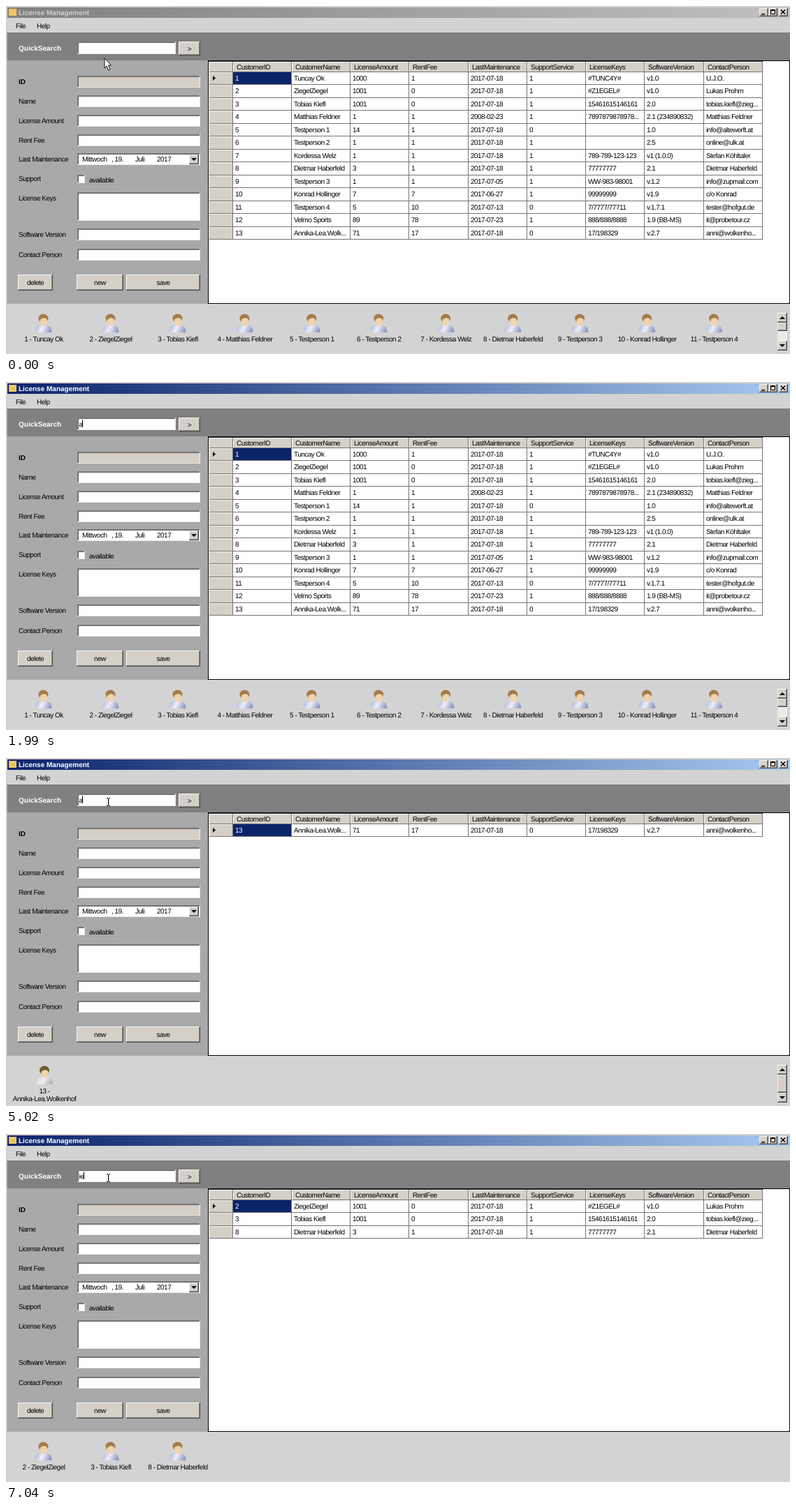
These frames come from a looping animation (1122 by 499 pixels, 8 s). An HTML page with a canvas:

```html
<!DOCTYPE html>
<html lang="en">
<head>
<meta charset="utf-8">
<title>License Management</title>
<style>
html, body { margin: 0; width: 100%; height: 100%; overflow: hidden; background: #d3d3d3; }
canvas { display: block; width: 1122px; height: 499px; }
</style>
</head>
<body>
<canvas id="stage"></canvas>
<script>
const W = 1122, H = 499, LOOP = 8000;
const canvas = document.getElementById('stage');
const dpr = window.devicePixelRatio || 1;
canvas.width = W * dpr;
canvas.height = H * dpr;
const ctx = canvas.getContext('2d');
ctx.scale(dpr, dpr);
ctx.textRendering = 'geometricPrecision';

const FACE = '#d4d0c8', NAVY = '#0a246a', LIGHT = '#d3d3d3', LINE = '#747474';
const FAMILY = '"Liberation Sans", Arial, sans-serif';

const HEADS = ['CustomerID', 'CustomerName', 'LicenseAmount', 'RentFee', 'LastMaintenance',
  'SupportService', 'LicenseKeys', 'SoftwareVersion', 'ContactPerson'];
const ROWS = [
  '1|Tuncay Ok|1000|1|2017-07-18|1|#TUNC4Y#|v1.0|U.J.O.',
  '2|ZiegelZiegel|1001|0|2017-07-18|1|#Z1EGEL#|v1.0|Lukas Prohm',
  '3|Tobias Kiefl|1001|0|2017-07-18|1|15461615146161|2.0|tobias.kiefl@zieg...',
  '4|Matthias Feldner|1|1|2008-02-23|1|7897879878978...|2.1 (234890832)|Matthias Feldner',
  '5|Testperson 1|14|1|2017-07-18|0||1.0|info@altewerft.at',
  '6|Testperson 2|1|1|2017-07-18|1||2.5|online@ulk.at',
  '7|Kordessa Welz|1|1|2017-07-18|1|789-789-123-123|v1 (1.0.0)|Stefan Köhltaler',
  '8|Dietmar Haberfeld|3|1|2017-07-18|1|77777777|2.1|Dietmar Haberfeld',
  '9|Testperson 3|1|1|2017-07-05|1|WW-983-98001|v.1.2|info@zupmail.com',
  '10|Konrad Hollinger|7|7|2017-06-27|1|99999999|v1.9|c/o Konrad',
  '11|Testperson 4|5|10|2017-07-13|0|7/7777/77711|v.1.7.1|tester@hofgut.de',
  '12|Velmo Sports|89|78|2017-07-23|1|888/888/8888|1.9 (BB-MS)|it@probetour.cz',
  '13|Annika-Lea.Wolk...|71|17|2017-07-18|0|17/198329|v.2.7|anni@wolkenho...'
].map(r => r.split('|'));

const ALL = ROWS, ONE = [ROWS[12]], THREE = [ROWS[1], ROWS[2], ROWS[7]];

const STEPS = [
  { at: 0, rows: ALL, text: '', pointer: 'arrow' },
  { at: 1000, rows: ALL, text: '', pointer: 'beam', tint: '#24378c' },
  { at: 1990, rows: ALL, text: 'a', caret: true },
  { at: 3000, rows: ONE, text: 'anni', pointer: 'beam' },
  { at: 4010, rows: ONE, text: 'anni', pointer: 'beam', caret: true },
  { at: 5020, rows: ONE, text: 'a', pointer: 'beam', caret: true },
  { at: 6030, rows: ONE, text: 'ie', caret: true },
  { at: 7040, rows: THREE, text: 'ie', pointer: 'beam', caret: true }
];

function rect(x, y, w, h, color) {
  ctx.fillStyle = color;
  ctx.fillRect(x, y, w, h);
}

function poly(points, color) {
  ctx.beginPath();
  points.forEach(([x, y]) => ctx.lineTo(x, y));
  ctx.closePath();
  ctx.fillStyle = color;
  ctx.fill();
}

function oval(x, y, rx, ry, color) {
  ctx.beginPath();
  ctx.ellipse(x, y, rx, ry, 0, 0, Math.PI * 2);
  ctx.fillStyle = color;
  ctx.fill();
}

// y is the vertical middle of the capitals
function label(str, x, y, { color = '#000', bold = false, align = 'left' } = {}) {
  ctx.font = (bold ? 'bold ' : '') + '10px ' + FAMILY;
  ctx.letterSpacing = bold ? '0px' : '-0.5px';
  ctx.textAlign = align;
  ctx.fillStyle = color;
  ctx.fillText(str, x, y + 3.6);
}

function edges(x, y, w, h, topLeft, bottomRight) {
  rect(x, y, w, 1, topLeft);
  rect(x, y, 1, h, topLeft);
  rect(x, y + h - 1, w, 1, bottomRight);
  rect(x + w - 1, y, 1, h, bottomRight);
}

function sunken(x, y, w, h, fill = '#fff') {
  rect(x, y, w, h, fill);
  edges(x, y, w, h, '#7c7c7c', '#ebe9e4');
  rect(x + 1, y + 1, w - 2, 1, '#6a6a68');
  rect(x + 1, y + 1, 1, h - 2, '#6a6a68');
}

function raised(x, y, w, h) {
  rect(x, y, w, h, FACE);
  edges(x, y, w, h, '#f6f5f2', '#484848');
  rect(x + 1, y + h - 2, w - 2, 1, '#908d88');
  rect(x + w - 2, y + 1, 1, h - 2, '#908d88');
}

function button(str, x, y, w, h) {
  raised(x, y, w, h);
  label(str, x + w / 2, y + h / 2, { align: 'center' });
}

function titleBar(active) {
  const g = ctx.createLinearGradient(2, 0, W, 0);
  g.addColorStop(0, active ? NAVY : '#808080');
  g.addColorStop(1, active ? '#a6caf0' : '#c0c0c0');
  rect(0, 0, W, 18, FACE);
  rect(2, 2, W - 2, 15, g);
  rect(4, 4, 11, 10, '#eec560');
  label('License Management', 18, 9, { color: active ? '#fff' : FACE, bold: true });
  raised(1078, 3, 13, 12);
  raised(1091, 3, 13, 12);
  raised(1106, 3, 13, 12);
  rect(1081, 11, 5, 1.5, '#000');
  ctx.strokeStyle = '#000';
  ctx.lineWidth = 1;
  ctx.strokeRect(1094.5, 5.5, 6, 6);
  rect(1094, 5, 7, 2, '#000');
  ctx.lineWidth = 1.4;
  ctx.beginPath();
  ctx.moveTo(1109, 5.5);
  ctx.lineTo(1115, 11.5);
  ctx.moveTo(1115, 5.5);
  ctx.lineTo(1109, 11.5);
  ctx.stroke();
}

function form() {
  label('ID', 18, 108, { bold: true });
  sunken(102, 100, 176, 17, FACE);
  const fields = [['Name', 128], ['License Amount', 156], ['Rent Fee', 184],
    ['Last Maintenance', 211], ['Software Version', 319], ['Contact Person', 348]];
  for (const [name, y] of fields) {
    label(name, 18, y + 8.3);
    sunken(102, y, 176, 17);
  }
  label('Mittwoch', 109, 219.5);
  label(', 19.', 151, 219.5);
  label('Juli', 185, 219.5);
  label('2017', 216, 219.5);
  raised(262, 213, 14, 14);
  poly([[265, 218], [273, 218], [269, 222]], '#000');

  label('Support', 18, 247.3);
  sunken(102, 242, 11, 12);
  label('available', 119, 249);
  label('License Keys', 18, 275);
  sunken(102, 267, 176, 41);
  button('delete', 17, 385, 50, 23);
  button('new', 101, 385, 67, 23);
  button('save', 172, 385, 106, 23);
}

function search(step) {
  label('QuickSearch', 18, 60, { color: '#fff', bold: true });
  sunken(102, 51, 141, 18);
  button('>', 247, 51, 31, 20);
  label(step.text, 104.5, 60);
  if (step.caret) {
    const end = Math.floor(104.5 + ctx.measureText(step.text).width);
    rect(end, 54, 1, 11, '#000');
  }
}

const colX = i => Math.floor(324 + i * 84.25);
const rowY = i => Math.floor(94 + i * 18.5);

function grid(rows) {
  rect(289, 78, 833, 349, '#000');
  rect(290, 79, 831, 347, '#fff');
  rect(291, 79, 792, 15, FACE);
  rect(290, 79, 793, 1, '#404040');
  rect(291, 80, 792, 1, '#f6f5f2');
  const bottom = rowY(rows.length);
  rect(291, 94, 33, bottom - 94, FACE);

  HEADS.forEach((h, i) => {
    label(h, colX(i) + 6, 87.3);
    rect(colX(i), 80, 1, 15, LINE);
    rect(colX(i) + 1, 81, 1, 13, '#fff');
  });
  rect(colX(9), 80, 1, 15, LINE);
  rect(291, 94, 792, 1, LINE);

  rows.forEach((row, r) => {
    const y = rowY(r), next = rowY(r + 1);
    if (r === 0) rect(325, y + 1, 83, next - y - 1, NAVY);
    rect(291, y + 1, 33, 1, '#f6f5f2');
    rect(291, next, 792, 1, LINE);
    row.forEach((cell, c) => {
      label(cell, colX(c) + 3.9, 103.3 + r * 18.5, { color: r + c === 0 ? '#fff' : '#000' });
    });
  });
  for (let i = 0; i < 10; i++) rect(colX(i), 94, 1, bottom - 93, LINE);
  poly([[296, 100], [300, 103.5], [296, 107]], '#000');
}

function person(x, y, hair, shirt, shade) {
  const g = ctx.createLinearGradient(x - 12, y + 16, x + 12, y + 27);
  g.addColorStop(0, shirt);
  g.addColorStop(0.45, '#eeeef6');
  g.addColorStop(1, shade);
  ctx.beginPath();
  ctx.moveTo(x - 12, y + 27);
  ctx.bezierCurveTo(x - 12, y + 18, x - 7, y + 16, x, y + 16);
  ctx.bezierCurveTo(x + 7, y + 16, x + 12, y + 18, x + 12, y + 27);
  ctx.closePath();
  ctx.fillStyle = g;
  ctx.fill();
  oval(x, y + 7, 7, 6.5, hair);
  oval(x + 0.5, y + 11, 5.2, 6.8, '#f0d4ae');
  poly([[x - 6, y + 9], [x - 4, y + 3], [x + 5, y + 3], [x + 6, y + 8], [x + 1, y + 6]], hair);
}

function scrollBar(thumb) {
  rect(1104, 440, 14, 54, '#eceae6');
  raised(1104, 440, 14, 14);
  raised(1104, 480, 14, 14);
  raised(1104, 454, 14, thumb);
  poly([[1107, 449], [1115, 449], [1111, 445]], '#000');
  poly([[1107, 485], [1115, 485], [1111, 489]], '#000');
}

function people(rows) {
  const mid = { align: 'center' };
  if (rows === ONE) {
    person(55, 441, '#6c5c2c', '#d8d8d2', '#aaaaa6');
    label('13 -', 55, 477, mid);
    label('Annika-Lea.Wolkenhof', 55, 488, mid);
  } else {
    rows.slice(0, 11).forEach((row, i) => {
      const x = 54 + i * 95.95;
      person(x - 0.5, 441, '#a47c48', '#a4aedc', '#7c88bc');
      label(row[0] + ' - ' + row[1], x, 477.3, mid);
    });
  }
  if (rows !== THREE) scrollBar(rows === ALL ? 12 : 26);
}

function pointer(kind, tint = '#000') {
  if (kind === 'arrow') {
    const tip = [[141, 75], [141, 89], [144, 86], [146.5, 92], [149, 91], [146.5, 85], [150.5, 85]];
    poly(tip, '#fff');
    ctx.strokeStyle = '#000';
    ctx.lineWidth = 0.9;
    ctx.stroke();
  } else if (kind === 'beam') {
    rect(146, 58, 1.2, 10, tint);
    for (const y of [57, 68]) {
      rect(144, y, 2, 1, tint);
      rect(147, y, 2, 1, tint);
    }
  }
}

function draw(t) {
  const step = STEPS.filter(s => s.at <= t).pop();
  rect(0, 0, W, H, LIGHT);
  titleBar(t >= 1000);
  label('File', 14, 28);
  label('Help', 44, 28);
  rect(0, 38, W, 40, '#808080');
  rect(0, 78, 290, 349, '#a9a9a9');
  rect(0, 18, 1.5, H, FACE);
  search(step);
  form();
  grid(step.rows);
  people(step.rows);
  pointer(step.pointer, step.tint);
}

const start = performance.now();
function tick() {
  draw((performance.now() - start) % LOOP);
  requestAnimationFrame(tick);
}
tick();
</script>
</body>
</html>
```
